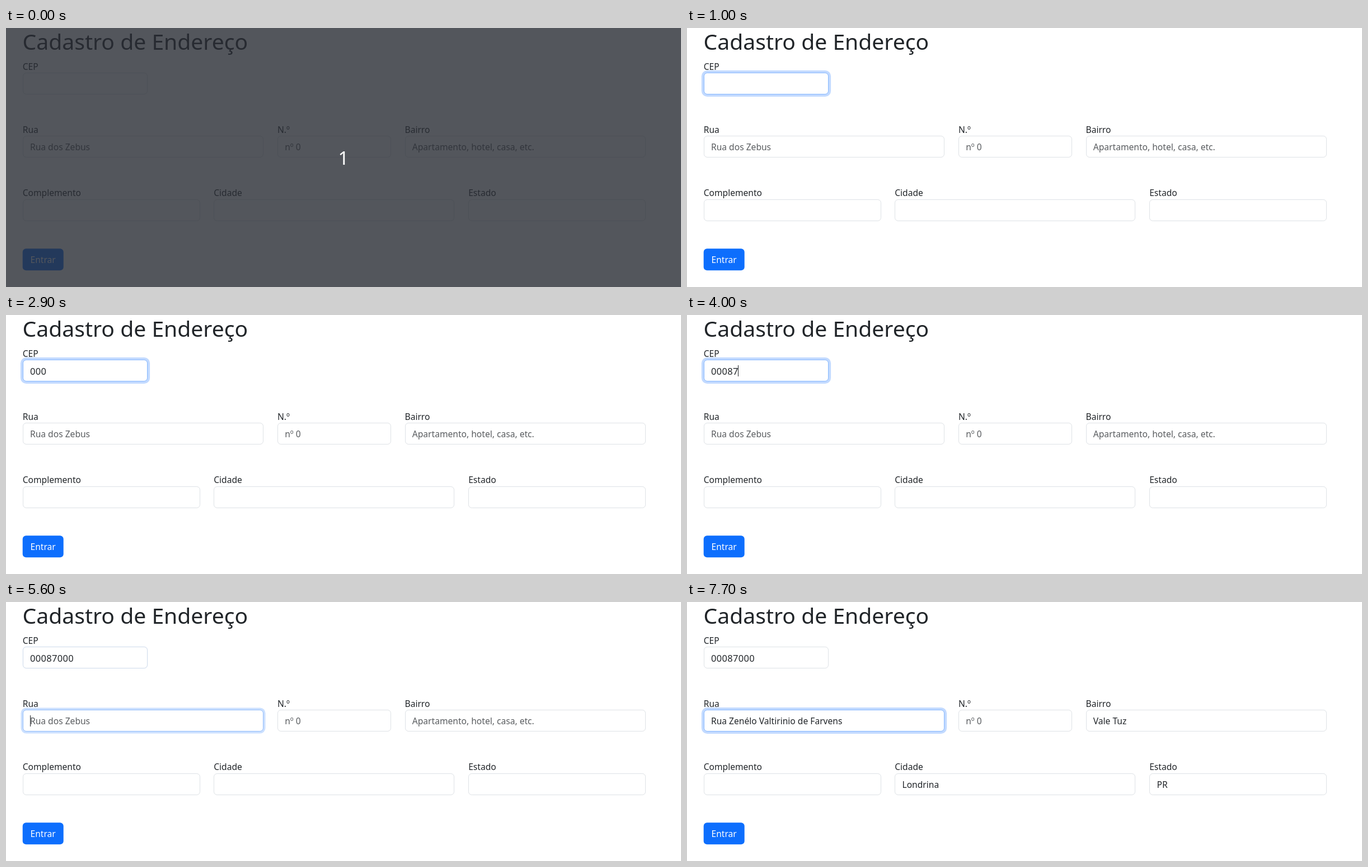
Recreate the animation shown at these times as an HTML page. Size 1206x464 px, loop 8000 ms.

```html
<!DOCTYPE html>
<html lang="pt-BR">
<head>
<meta charset="utf-8">
<title>Cadastro de Endereço</title>
<style>
  html, body { margin: 0; width: 100%; height: 100%; overflow: hidden; background: #fff; }
  #stage {
    position: relative; width: 1206px; height: 464px; overflow: hidden;
    font: 15.6px/24px "Noto Sans", sans-serif; color: #212529; white-space: nowrap;
  }
  #stage > * { position: absolute; box-sizing: border-box; margin: 0; }
  h1 { left: 29.6px; top: 0; font-size: 39.1px; line-height: 48px; font-weight: 400; }
  .field {
    height: 38.95px; padding-left: 12.3px; line-height: 39px;
    border: 1px solid #dee2e6; border-radius: 6.15px; background: #fff;
  }
  .empty { color: rgba(33, 37, 41, .75); }
  .digits { font-size: 16.5px; letter-spacing: .3px; }
  .button {
    left: 30px; top: 395px; width: 73px; height: 39px; border-radius: 6.15px;
    background: #0d6efd; color: #fff; line-height: 41px; text-align: center;
    transform: translate(-.3px, .3px);
  }
  #caret { width: 1px; height: 20px; background: #212529; }
  #veil {
    inset: 0; background: rgba(40, 44, 52, .8); color: #fff;
    font-size: 33px; line-height: 466px; text-align: center;
  }
</style>
</head>
<body>
<div id="stage">
  <h1>Cadastro de Endereço</h1>
  <div class="button">Entrar</div>
</div>
<script>
const LOOP = 8000;
const FILLED = 5900;
const CEP = "00087000";
const KEY_TIMES = [1700, 1900, 2300, 3800, 4000, 4500, 4900, 5200];
const CARET_OFF = [[0, 500], [1000, 1700], [2900, 3500], [6500, 7100], [7700, 8000]];

const stage = document.getElementById("stage");

function add(className, text, style) {
  const el = document.createElement("div");
  el.className = className;
  el.textContent = text;
  Object.assign(el.style, style);
  stage.append(el);
  return el;
}

function addField(label, x, row, width, hint = "", value = "") {
  const y = 80.1 + 113.3 * row;
  add("label", label, { left: x + "px", top: y - 23.6 + "px" });
  const el = add("field", hint, { left: x + "px", top: y + "px", width: width + "px" });
  return { el, hint, value };
}

const cep = addField("CEP", 29.7, 0, 223.8);
const street = addField("Rua", 29.7, 1, 430.5, "Rua dos Zebus", "Rua Zenélo Valtirinio de Farvens");
const autofill = [
  street,
  addField("N.º", 484.9, 1, 203, "nº 0"),
  addField("Bairro", 712.5, 1, 430.5, "Apartamento, hotel, casa, etc.", "Vale Tuz"),
  addField("Complemento", 29.7, 2, 317),
  addField("Cidade", 371.2, 2, 430, "", "Londrina"),
  addField("Estado", 826.2, 2, 317, "", "PR")
];
cep.el.classList.add("digits");

const caret = add("", "", {});
caret.id = "caret";
const veil = add("", "1", {});
veil.id = "veil";

function setText(el, text) {
  if (el.textContent !== text) el.textContent = text;
}

function setFocus(field, amount) {
  const mix = (a, b) => Math.round(a + (b - a) * amount);
  field.el.style.borderColor = `rgb(${mix(222, 134)}, ${mix(226, 183)}, ${mix(230, 254)})`;
  field.el.style.boxShadow = `0 0 0 ${4.1 * amount}px rgba(13, 110, 253, ${0.25 * amount})`;
}

// Focus fades are sampled every 100 ms
function streetFocus(t) {
  if (t < 5500) return 0;
  return t < 5600 ? 0.25 : t < 5700 ? 0.85 : 1;
}

function cepFocus(t) {
  if (t < 500) return 0;
  return t < 600 ? 0.5 : 1 - streetFocus(t);
}

function render(t) {
  const typed = KEY_TIMES.filter(time => t >= time).length;
  setText(cep.el, CEP.slice(0, typed));
  setFocus(cep, cepFocus(t));
  setFocus(street, streetFocus(t));

  for (const { el, hint, value } of autofill) {
    const full = t >= FILLED && value !== "";
    setText(el, full ? value : hint);
    el.classList.toggle("empty", !full);
  }

  const inStreet = t >= 5500;
  const x = inStreet ? (t < FILLED ? 43 : 277) : Math.floor(43 + 9.75 * typed);
  caret.style.left = x + "px";
  caret.style.top = (inStreet ? 203 : 90) + "px";
  const hidden = CARET_OFF.some(([from, to]) => t >= from && t < to);
  caret.style.visibility = hidden ? "hidden" : "visible";
  veil.style.visibility = t < 100 ? "visible" : "hidden";
}

const start = performance.now();
function tick() {
  render((performance.now() - start) % LOOP);
  requestAnimationFrame(tick);
}
tick();
</script>
</body>
</html>
```
